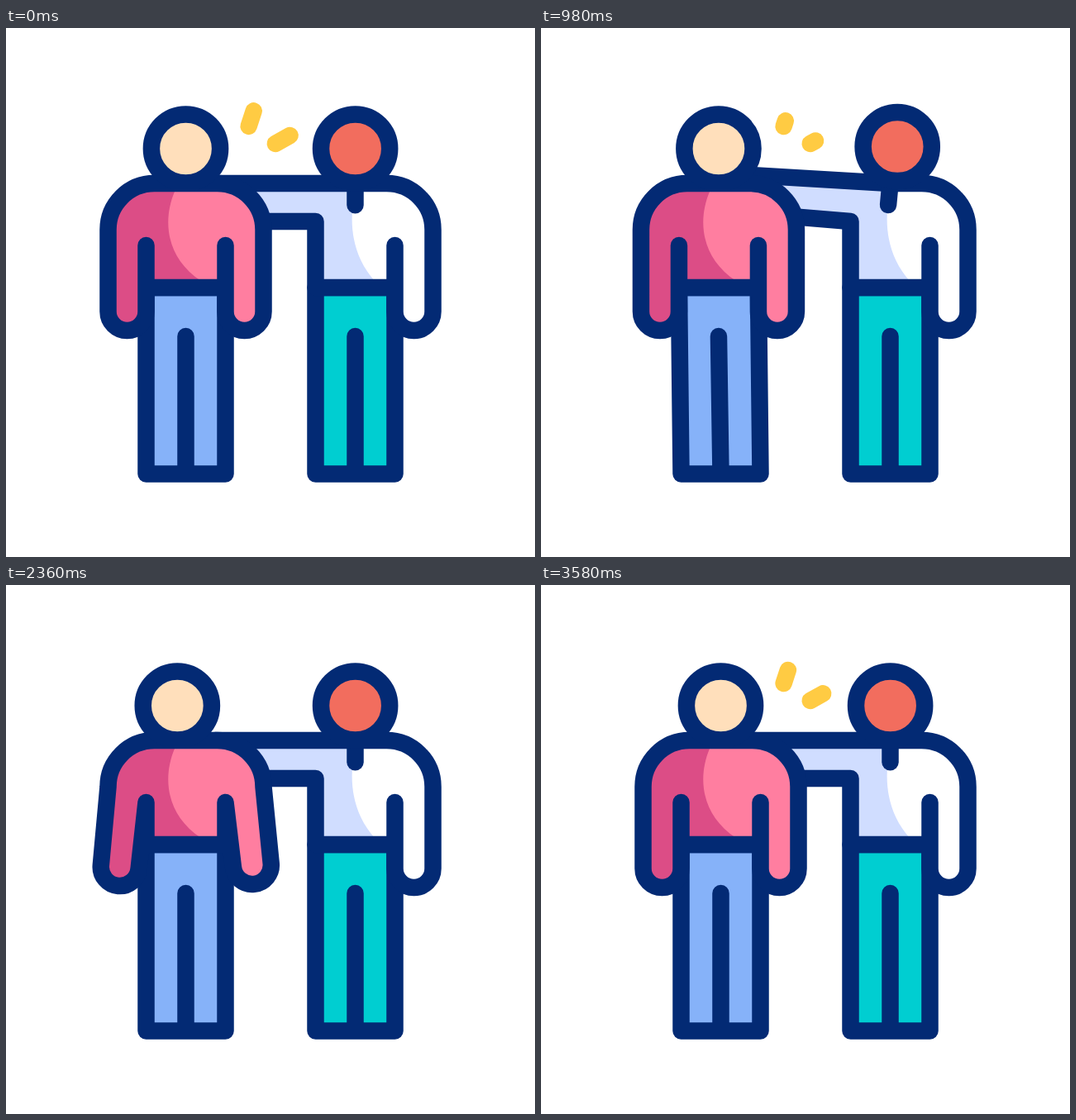
An HTML page that plays this animation: 640x640 px, repeating every 3.6 s.

```html
<!DOCTYPE html>
<html lang="en">
<head>
<meta charset="utf-8">
<title>Two friends</title>
<style>
  html, body { margin: 0; width: 100%; height: 100%; overflow: hidden; background: #fff; }
  svg { display: block; width: 100vw; height: 100vh; }
  .line { stroke: #032a74; stroke-width: 20.5; stroke-linecap: round; stroke-linejoin: round; fill: none; }
  .spark { stroke: #ffcb43; stroke-width: 20.5; stroke-linecap: round; }
</style>
</head>
<body>
<svg viewBox="0 0 640 640">
  <clipPath id="shirtClip"><path id="clipShape"/></clipPath>

  <path id="sparkA" class="spark"/>
  <path id="sparkB" class="spark"/>

  <g id="rightFriend">
    <path d="M374.5 314H470.5V539.5H374.5Z" fill="#00ced1"/>
    <path class="line" d="M374.5 314H470.5V539.5H374.5ZM422.5 373V539.5"/>
    <path id="coat" fill="#fff"/>
    <path id="coatShade" fill="#d0ddff"/>
    <path id="coatLine" class="line"/>
    <path id="collar" class="line"/>
    <circle id="headR" class="line" cx="422.6" cy="146" r="41.6" style="fill:#f26d5e"/>
  </g>

  <g id="leftFriend">
    <path id="jeans" fill="#86b2f9"/>
    <path id="jeansLine" class="line"/>
    <path id="shirt" fill="#ff7ea0"/>
    <path clip-path="url(#shirtClip)" fill="#dc4d86"
      d="M80 180H210L204 198C188 236 196 280 236 306V390H80Z"/>
    <path id="shirtLine" class="line"/>
    <circle id="headL" class="line" cx="217.5" cy="146" r="41.6" style="fill:#ffdfbb"/>
  </g>
</svg>
<script>
const LOOP = 3600;
const $ = id => document.getElementById(id);
const draw = (id, d) => $(id).setAttribute('d', d);

// [time, value] pairs, eased between neighbours
const tracks = {
  lift:  [[0, 0], [250, 45], [500, 0], [785, 45], [1071, 0], [1342, 45], [1607, 0]],
  lean:  [[240, 0], [500, -3.3], [785, 0], [1071, -3.3], [1342, 0]],
  tilt:  [[0, 0], [500, 1], [1640, 1], [1960, 0]],
  swing: [[1630, 0], [1970, 1], [2200, 1], [2470, 0], [2530, 0], [2890, 1], [3250, 1], [3580, 0]],
  nod:   [[1630, 0], [1960, -10.5], [2300, -10.5], [2840, 0]]
};

// moments of contact: sparks grow just before and shrink just after
const hits = [0, 500, 1071, LOOP];
const GROW = 140, SHRINK = 150;

function at(track, t) {
  if (t <= track[0][0]) return track[0][1];
  for (let i = 1; i < track.length; i++) {
    const [t0, a] = track[i - 1], [t1, b] = track[i];
    if (t < t1) return a + (b - a) * (1 - Math.cos(Math.PI * (t - t0) / (t1 - t0))) / 2;
  }
  return track[track.length - 1][1];
}

function spark(id, x0, y0, x1, y1, t) {
  let from = 0, to = 0;
  for (const hit of hits) {
    const dt = t - hit;
    if (dt > -GROW && dt <= 0) to = 1 + dt / GROW;
    else if (dt > 0 && dt < SHRINK) { from = dt / SHRINK; to = 1; }
  }
  const point = k => `${x0 + (x1 - x0) * k} ${y0 + (y1 - y0) * k}`;
  draw(id, to > from ? `M${point(from)}L${point(to)}` : '');
}

// both ends of the half circle that closes a sleeve
function hand(x, y, degrees) {
  const a = degrees * Math.PI / 180, dx = 23 * Math.cos(a), dy = 23 * Math.sin(a);
  return { left: `${x - dx} ${y - dy}`, right: `${x + dx} ${y + dy}` };
}

function leftFriend(lean, swing, nod) {
  const X = x => x + lean;
  const l = hand(X(146.5 - 25 * swing), 343 - 5.5 * swing, 15 * swing);
  const r = hand(X(288.5 + 26.5 * swing), 343 - 11.5 * swing, -17 * swing);
  const shirt = `M${X(169.5)} 263L${l.right}A23 23 0 0 1 ${l.left}L${X(123.5)} 244` +
    `A56 56 0 0 1 ${X(179.5)} 188H${X(255.5)}A56 56 0 0 1 ${X(311.5)} 244` +
    `L${r.right}A23 23 0 0 1 ${r.left}L${X(265.5)} 263V314H${X(169.5)}Z`;
  const jeans = `M${X(169.5)} 314H${X(265.5)}L265.5 539.5H169.5Z`;
  draw('shirt', shirt);
  draw('clipShape', shirt);
  draw('shirtLine', `${shirt}M${X(169.5)} 263V314M${X(265.5)} 263V314`);
  draw('jeans', jeans);
  draw('jeansLine', `${jeans}M${X(217.5)} 373L217.5 539.5`);
  $('headL').setAttribute('cx', X(217.5) + nod);
}

function rightFriend(lift, tilt) {
  const top = 188 - lift, low = 234 - lift;
  const coat = `M253 ${low}L374.5 234V314H470.5V263V343A23 23 0 0 0 516.5 343V244` +
    `A56 56 0 0 0 460.5 188H422.5L253 ${top}`;
  draw('coat', coat);
  draw('coatLine', `${coat}M470.5 263V314`);
  draw('coatShade', `M253 ${top}L422.5 188V198C413 240 421 278 446 306V314H374.5V234L253 ${low}Z`);
  draw('collar', `M422.5 188L${422.5 - 0.24 * lift} ${214.3 - 0.02 * lift}`);
  $('headR').setAttribute('cx', 422.6 + 8.6 * tilt);
  $('headR').setAttribute('cy', 146 - 2.5 * tilt);
}

function render(t) {
  const v = {};
  for (const name in tracks) v[name] = at(tracks[name], t);
  spark('sparkA', 293.6, 119, 299.7, 100.4, t);
  spark('sparkB', 325.7, 140, 343.6, 130, t);
  rightFriend(v.lift, v.tilt);
  leftFriend(v.lean, v.swing, v.nod);
}

const start = performance.now();
function tick() {
  render((performance.now() - start) % LOOP);
  requestAnimationFrame(tick);
}
render(0);
requestAnimationFrame(tick);
</script>
</body>
</html>
```
